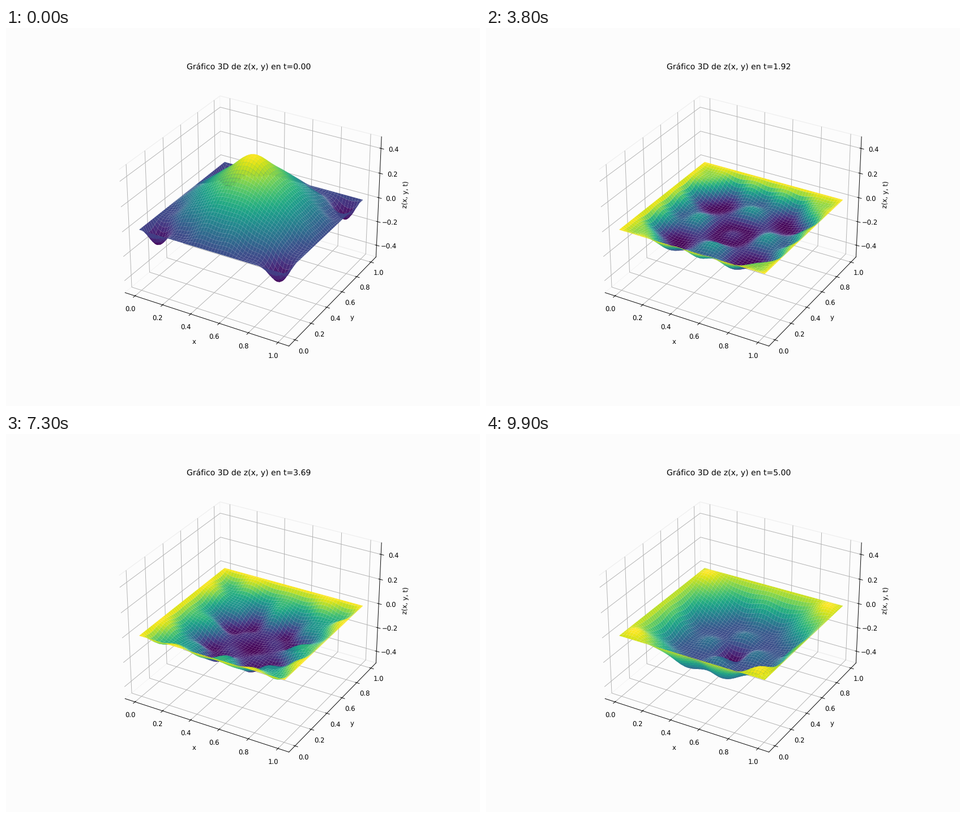
Recreate the animation shown at these times as a matplotlib script. Size 837 px wide and 669 px high, loop 10000 ms.

```python
import numpy as np
import matplotlib.pyplot as plt
from matplotlib.animation import FuncAnimation

W, H, DPI = 837, 669, 83.7
FRAMES, INTERVAL, T_END = 100, 100, 5.0
C = 1.0           # wave speed
MODES = 10        # sine modes per direction
POINTS = 100      # surface grid points per side
PAPER = "#fcfcfc"

plt.rcParams["text.hinting"] = "none"


def initial(x, y):
    """Cone of height 0.5 over the centre of the unit square."""
    return 0.5 - np.hypot(x - 0.5, y - 0.5)


def sine_coeffs(f, modes, cells=600):
    """Double sine series of f on the unit square (midpoint rule)."""
    s = (np.arange(cells) + 0.5) / cells
    basis = np.sin(np.pi * np.outer(modes, s))
    return 4 * basis @ f(s[:, None], s[None, :]) @ basis.T / cells**2


modes = np.arange(1, MODES + 1)
coeffs = sine_coeffs(initial, modes)
omega = C * np.pi * np.hypot(modes[:, None], modes[None, :])

side = np.linspace(0, 1, POINTS)
X, Y = np.meshgrid(side, side)
shape = np.sin(np.pi * np.outer(side, modes))

# Each patch spans two grid steps and keeps the points along its rim.
lo = np.arange(0, POINTS - 1, 2)
mid = lo + 1
hi = np.minimum(lo + 2, POINTS - 1)
RIM = [(lo, lo), (lo, mid), (lo, hi), (mid, hi),
       (hi, hi), (hi, mid), (hi, lo), (mid, lo)]


def height(t):
    return shape @ (coeffs * np.cos(omega * t)) @ shape.T


def patches(Z):
    P = np.stack([X, Y, Z], axis=-1)
    rim = [P[np.ix_(rows, cols)] for rows, cols in RIM]
    return np.stack(rim, axis=2).reshape(-1, len(RIM), 3)


fig = plt.figure(figsize=(W / DPI + 1e-5, H / DPI + 1e-5), dpi=DPI, facecolor=PAPER)
ax = fig.add_subplot(projection="3d", facecolor=PAPER)

pad = (1.1 * 25 / 24 - 1) / 2
ax.set_xlim(-pad, 1 + pad)
ax.set_ylim(-pad, 1 + pad)
ax.set_zlim(-0.5, initial(X, Y).max())
ax.set_xlabel("x")
ax.set_ylabel("y")
ax.set_zlabel("z(x, y, t)")
for axis in (ax.xaxis, ax.yaxis, ax.zaxis):
    axis.pane.set_alpha(1)
    axis.pane.set_facecolor(PAPER)
    axis.pane.set_edgecolor("#eeeeee")

title = ax.set_title("")
surf = ax.plot_surface(X, Y, height(0), cmap="viridis")


def update(i):
    t = T_END * i / (FRAMES - 1)
    verts = patches(height(t))
    level = verts[:, :, 2].mean(axis=1)
    surf.set_verts(verts)
    surf.set_array(level)
    surf.set_clim(level.min(), level.max())
    title.set_text(f"Gráfico 3D de z(x, y) en t={t:.2f}")
    return surf, title


anim = FuncAnimation(fig, update, frames=FRAMES, interval=INTERVAL,
                     repeat=True, repeat_delay=0, blit=False)
plt.show()
```
